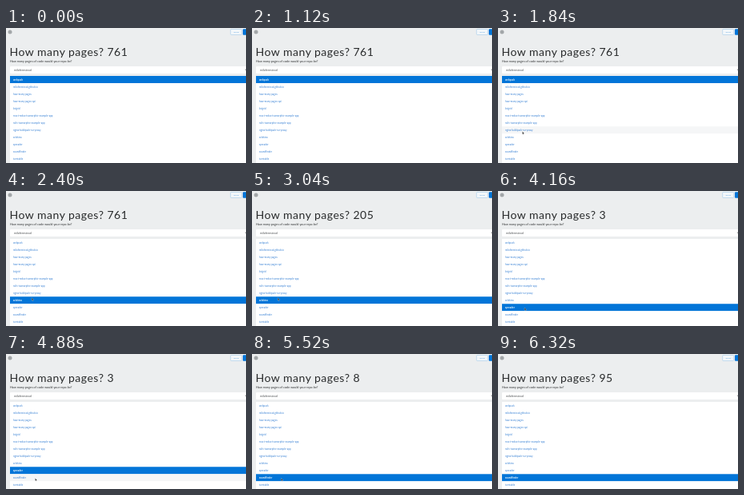
An HTML page for the animation above (6800 ms loop, 300 by 169 pixels).

```html
<!DOCTYPE html>
<html lang="en">
<head>
<meta charset="utf-8">
<title>How many pages?</title>
<style>
  html, body { margin: 0; width: 100%; height: 100%; overflow: hidden; background: #eceeef; }
  svg { display: block; width: 100%; height: 100%; font-family: Lato, sans-serif; }
  text { letter-spacing: .034em; fill: #292b2c; }
  .title { font-size: 14px; }
  .lead { font-size: 3.6px; }
  .field { font-size: 3.4px; fill: #464a4c; }
  .button { font-size: 2.6px; fill: #5a9fdd; text-anchor: middle; }
  .row rect { fill: #fff; }
  .row text { font-size: 2.85px; fill: #2f7bd2; }
  .row.hover rect { fill: #f5f6f7; }
  .row.active rect { fill: #0275d8; }
  .row.active text { fill: #fff; font-weight: 700; }
</style>
</head>
<body>
<svg viewBox="0 0 300 169" preserveAspectRatio="none">
  <rect width="300" height="169" fill="#eceeef"/>
  <circle cx="5" cy="5" r="2.5" fill="#a3a7a9"/>
  <rect x="280.7" y="1.5" width="14" height="7" rx="1" fill="#f3f7fa" stroke="#7fb5e4" stroke-width=".4"/>
  <text class="button" x="287.8" y="5.9">Share</text>
  <rect x="296" y="1.3" width="10" height="7.4" rx="1" fill="#0275d8"/>
  <text class="title" x="4.6" y="35" id="title"></text>
  <text class="lead" x="5" y="43.1">How many pages of code would your repo be?</text>
  <rect x="5" y="48" width="300" height="9" rx="1" fill="#fff"/>
  <text class="field" x="10" y="53.6">milofernstead</text>
  <path d="M298.6 51.7h2l-1 1.3z" fill="#777"/>
  <rect x="5" y="60" width="295" height="109" fill="#fff"/>
  <g id="list"></g>
  <path id="cursor" d="M0 0V3.4L.8 2.7 1.3 3.9 1.9 3.6 1.4 2.5H2.4Z" fill="#222" stroke="#fff" stroke-width=".25"/>
</svg>
<script>
const LOOP = 6800, TICK = 80, TOP = 60, ROW = 9.03;
const repos = [
  'webpack', 'milofernstead.github.io', 'how-many-pages', 'how-many-pages-api',
  'brigrid', 'react-redux-isomorphic-example-app', 'rails-isomorphic-example-app',
  'nginx-buildpack-ssr-proxy', 'selektro', 'spreader', 'soundfinder', 'turntable'
];
// Each click selects a row; its page count starts to load in at `shown`.
const clicks = [
  { at: 0, row: 0, shown: 0, pages: 761 },
  { at: 2320, row: 8, shown: 2880, pages: 3 },
  { at: 4160, row: 9, shown: 4880, pages: 2 },
  { at: 5120, row: 10, shown: 5520, pages: 95 }
];
const COUNT_TIME = 240;
// The pointer enters, glides to each stop, then leaves.
const entry = { x: 270, y: 160, at: 1440 };
const moves = [
  { at: 1440, end: 1840, x: 30.5, y: 129.5 },
  { at: 1920, end: 2160, x: 32.2, y: 133.7 },
  { at: 3360, end: 3680, x: 33.2, y: 146 },
  { at: 4160, end: 4720, x: 36.5, y: 155.4 },
  { at: 5840, end: 6000, x: 262, y: 141 }
];
const title = document.getElementById('title');
const list = document.getElementById('list');
const cursor = document.getElementById('cursor');

const mix = (a, b, p) => a + (b - a) * p;
const progress = (t, from, to) => Math.min(1, Math.max(0, (t - from) / (to - from)));
const easeOut = p => 1 - (1 - p) ** 2;

const make = (tag, attrs, parent) => {
  const node = document.createElementNS('http://www.w3.org/2000/svg', tag);
  for (const key in attrs) node.setAttribute(key, attrs[key]);
  return parent.appendChild(node);
};
const rows = repos.map((name, i) => {
  const y = TOP + i * ROW;
  const row = make('g', { class: 'row' }, list);
  make('rect', { x: 5, y, width: 295, height: ROW }, row);
  make('text', { x: 9, y: y + 5.5 }, row).textContent = name;
  return row;
});

const pagesAt = t => Math.round(clicks.reduce(
  (pages, click) => mix(pages, click.pages, progress(t, click.shown - 16, click.shown + COUNT_TIME - 16)), 761));

function pointerAt(t) {
  if (t < entry.at || t > moves[moves.length - 1].end) return null;
  let { x, y } = entry;
  for (const move of moves) {
    const p = easeOut(progress(t, move.at, move.end));
    x = mix(x, move.x, p);
    y = mix(y, move.y, p);
  }
  return [x, y];
}

function draw(now) {
  const t = Math.floor(now % LOOP / TICK) * TICK;
  const active = clicks.filter(click => click.at <= t).pop().row;
  const pointer = pointerAt(t);
  const hover = pointer ? Math.floor((pointer[1] - TOP) / ROW) : -1;
  title.textContent = 'How many pages? ' + pagesAt(t);
  rows.forEach((row, i) => {
    row.setAttribute('class', 'row' + (i === active ? ' active' : i === hover ? ' hover' : ''));
  });
  cursor.style.display = pointer ? '' : 'none';
  if (pointer) cursor.setAttribute('transform', `translate(${pointer})`);
}

const start = performance.now();
function frame() {
  draw(performance.now() - start);
  requestAnimationFrame(frame);
}
frame();
</script>
</body>
</html>
```
